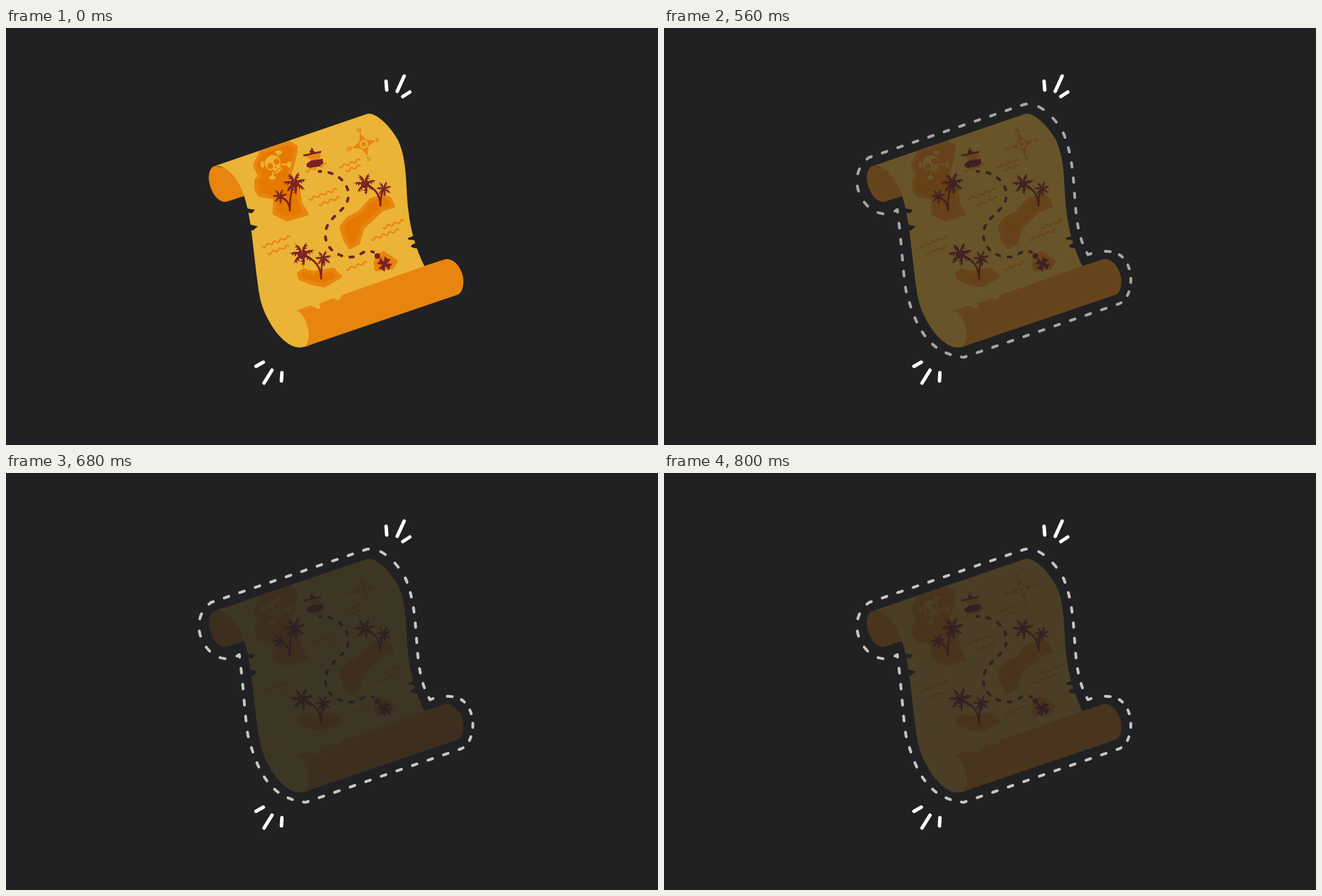
An HTML page for the animation above (2.44 s loop, 935x599 px).

```html
<!DOCTYPE html>
<html lang="en">
<head>
<meta charset="utf-8">
<title>Treasure map</title>
<style>
  html, body { margin: 0; width: 100%; height: 100%; overflow: hidden; background: #212123; }
  svg { display: block; width: 935px; height: 599px; }
  .line { fill: none; stroke-linecap: round; stroke-linejoin: round; }
  .sheet { fill: #ebb436; }
  .roll { fill: #e8850f; }
  .land { fill: #e67a00; stroke: #e8850f; stroke-width: 5.5; stroke-linejoin: round; }
  .dark { fill: #e67a00; }
  .ink { fill: #7a2122; }
  .hole { fill: #212123; }
  .wave { stroke: #e8850f; stroke-width: 2.2; }
  .trunk { stroke: #7a2122; stroke-width: 2.5; }
  .bone { stroke: #ebb436; stroke-width: 2.6; }
  .knob { stroke: #ebb436; stroke-width: 5; }
  .spark { stroke: #fff; stroke-width: 5; }
  .dash { stroke: #fff; stroke-width: 4; stroke-dasharray: .3 .7; stroke-dashoffset: .15; }
  .trail { stroke: #7a2122; }
  text { font: 800 8.5px Inter, "Open Sans", sans-serif; fill: #e8850f; text-anchor: middle; }
</style>
</head>
<body>
<svg viewBox="0 0 935 599">
  <defs>
    <clipPath id="paper"><path id="sheet" d="M300 198L519 123C532 122 552 142 562 161C576 190 573 230 577 262C580 290 588 318 600 342L631 332L500 420L432 457L422 459C394 459 368 411 364 386C361 370 357 335 354 309C352 290 348 260 341 240C333 215 318 198 300 198Z"/></clipPath>
  </defs>
  <g id="map">
    <path class="roll" d="M300 198C292 200 290 210 291 219C294 238 306 253 318 249L346 240L330 205Z"/>
    <use href="#sheet" class="sheet"/>
    <path class="roll" d="M417 405.5L437 398.5L448 404L451 401L449 396L471 387.5Q472 391 477 391Q481 389 481 384L600 342L631 332C641 331 652 341 655.5 358C657 370 654 381 648 383L425 459C440 455 436 416 417 405.5Z"/>
    <path class="hole" d="M344 259L357 261L353 266L344 265ZM349 282L361 285L354 291L349 290ZM588 297L576 302L577 304L588 305ZM590 309L584 310L580 314L585 316L592 317Z"/>

    <g id="islands">
      <path class="land" clip-path="url(#paper)" d="M366 178L406 165L416 171L413 189L407 210L419 230L422 252L431 267L403 275L385 266L386 244L364 240L359 232L359 219L364 213L357 197Z"/>
      <path class="land" d="M481 286L491 273L506 266L522 248L541 240L551 246L555 256L539 261L511 287L505 309L493 315L486 304Z"/>
      <path class="land" d="M420 353L427 348L440 352L469 347L479 357L456 370L438 366L422 360Z"/>
      <path class="land" d="M530 337L533 328L541 323L559 335L554 344L531 347Z"/>
    </g>

    <g id="skull">
      <path class="line bone" d="M369 196H405M391 180L382 213"/>
      <path class="line knob" d="M368 194v4M406 194v4M389 178.500h4M380 215h4"/>
      <g transform="translate(384 196) rotate(-35)">
        <path class="sheet" stroke="#e67a00" stroke-width="1.5" d="M-12 -3C-12 -18 12 -18 12 -3C12 4 9 5 7 6V14H-6V6C-9 5 -12 4 -12 -3Z"/>
        <ellipse class="dark" cx="-5.5" cy="-1" rx="4" ry="4.5"/>
        <ellipse class="dark" cx="5.5" cy="-1" rx="4" ry="4.5"/>
        <path class="dark" d="M0 3L2 6H-2Z"/>
        <path stroke="#e67a00" d="M-6 9H7M-3 9V14M.5 9V14M4 9V14"/>
      </g>
    </g>

    <g id="compass" transform="translate(513 167) rotate(-18)">
      <path class="roll" d="M0 -18L5 -5L18 0L5 5L0 18L-5 5L-18 0L-5 -5Z"/>
      <circle class="roll" r="7.5"/>
      <circle class="line bone" r="4.8" stroke-width="2"/>
      <text y="-18">N</text><text x="21" y="3">E</text>
      <text y="25">S</text><text x="-22" y="3">W</text>
    </g>

    <g id="waves"></g>
    <g id="ship">
      <path class="roll" d="M428 183L451 178V186L447 189H437Z"/>
      <path class="ink" d="M426 182L452 176.500V179L427 184.500ZM437 181L435 176L438 175L437 172L440 173V175L443 178L442 180ZM431 195L438 190L454 188L455 194L450 198.500L436 201L431 199Z"/>
    </g>
    <path class="line dash trail" pathLength="13" d="M449 206C470 205 492 220 491 241C490 265 458 270 458 297C458 318 477 329 494 329C508 330 512 316 527 322"/>
    <circle class="ink" cx="532.500" cy="327.500" r="4"/>
    <g id="cross" transform="translate(543 339)"></g>
    <g id="palms"></g>
  </g>
  <g id="outline"></g>
  <path class="line spark" d="M545 76.500L546 89M571 69L561 91M579 92L569 98.500M358.500 486L369 480M381.500 491.500L370 510M395.700 495L395 507"/>
</svg>
<script>
const $ = id => document.getElementById(id);

function add(id, d, cls, attrs = {}) {
  const p = document.createElementNS('http://www.w3.org/2000/svg', 'path');
  p.setAttribute('d', d);
  p.setAttribute('class', cls);
  for (const k in attrs) p.setAttribute(k, attrs[k]);
  $(id).append(p);
}

// Water: n ripples along the tilt of the map
function wave(x, y, n) {
  add('waves', 'M0 0' + 'q2.6 3.4 5.2 0t5.2 0'.repeat(n), 'line wave',
    { transform: `translate(${x} ${y}) rotate(-20)` });
}
wave(478, 200, 3); wave(488, 205, 2);
wave(435, 246, 4); wave(449, 254, 3);
wave(368, 314, 4); wave(376, 324, 3);
wave(541, 287, 3); wave(524, 304, 4);
wave(488, 347, 3); wave(430, 206, 3);

for (let a = 27; a < 360; a += 90) {
  add('cross', 'M-1.5 0L-5 -10L0 -8.5L5 -10L1.5 0Z', 'ink', { transform: `rotate(${a})` });
}

// Palm: the trunk rises from its root and bends to the crown
function palm(rootX, rootY, x, y, size) {
  const fronds = 7;
  const leaf = 'M0 0Q8 -5 17 1L13 .3L13 3.5L10 0L9.500 4L6.500 0L5.500 3Z';
  add('palms', `M${x} ${y}Q${rootX} ${y * .7 + rootY * .3} ${rootX} ${rootY}`, 'line trunk');
  for (let i = 0; i < fronds; i++) {
    const a = i * 360 / fronds - 20;
    const droop = Math.cos(a * Math.PI / 180) < 0 ? -1 : 1;
    add('palms', leaf, 'ink', {
      transform: `translate(${x} ${y}) rotate(${a}) scale(${size / 17} ${droop * size / 17})`
    });
  }
}
palm(407, 262, 414, 223, 18); palm(407, 262, 393, 242, 12);
palm(537, 255, 515, 224, 17); palm(537, 255, 542, 231, 12);
palm(452, 360, 425, 325, 19); palm(452, 360, 455, 331, 13);

// Each piece of the outline starts and ends on the middle of a dash
function cut(n, d) {
  add('outline', d, 'line dash', { pathLength: n });
}
cut(10, 'M294 186L516 110');
cut(3, 'M516 110C541 103 568 139 574 154');
cut(8, 'M574 154C597 213 580 278 608 325.5');
cut(1, 'M608 325.5Q624 320 637 321');
cut(5, 'M637 321C676 321.5 678 384.5 653 396');
cut(10, 'M653 396L430 473');
cut(11, 'M430 473C374 468 358 418 347 377C342 345 341 308 334.5 261');
cut(5, 'M334.5 261C297 287.5 251 218.5 294 186');

// Smooth fade out, then a faint flicker that settles
const loop = 2440;
const smooth = u => u * u * (3 - 2 * u);
const fade = [[0, 1]];
for (let t = 520; t <= 600; t += 20) fade.push([t, 1 - smooth((t - 500) / 100)]);
fade.push([680, .145], [700, .23], [740, .3], [800, .2], [loop, .2]);

function play(id, level) {
  const frames = fade.map(([t, v]) => (
    { offset: t / loop, opacity: level(v), easing: 'steps(1, end)' }));
  $(id).animate(frames, { duration: loop, iterations: Infinity });
}
play('map', v => v);
play('outline', v => Math.min(.75, .93 * (1 - v)));
</script>
</body>
</html>
```
